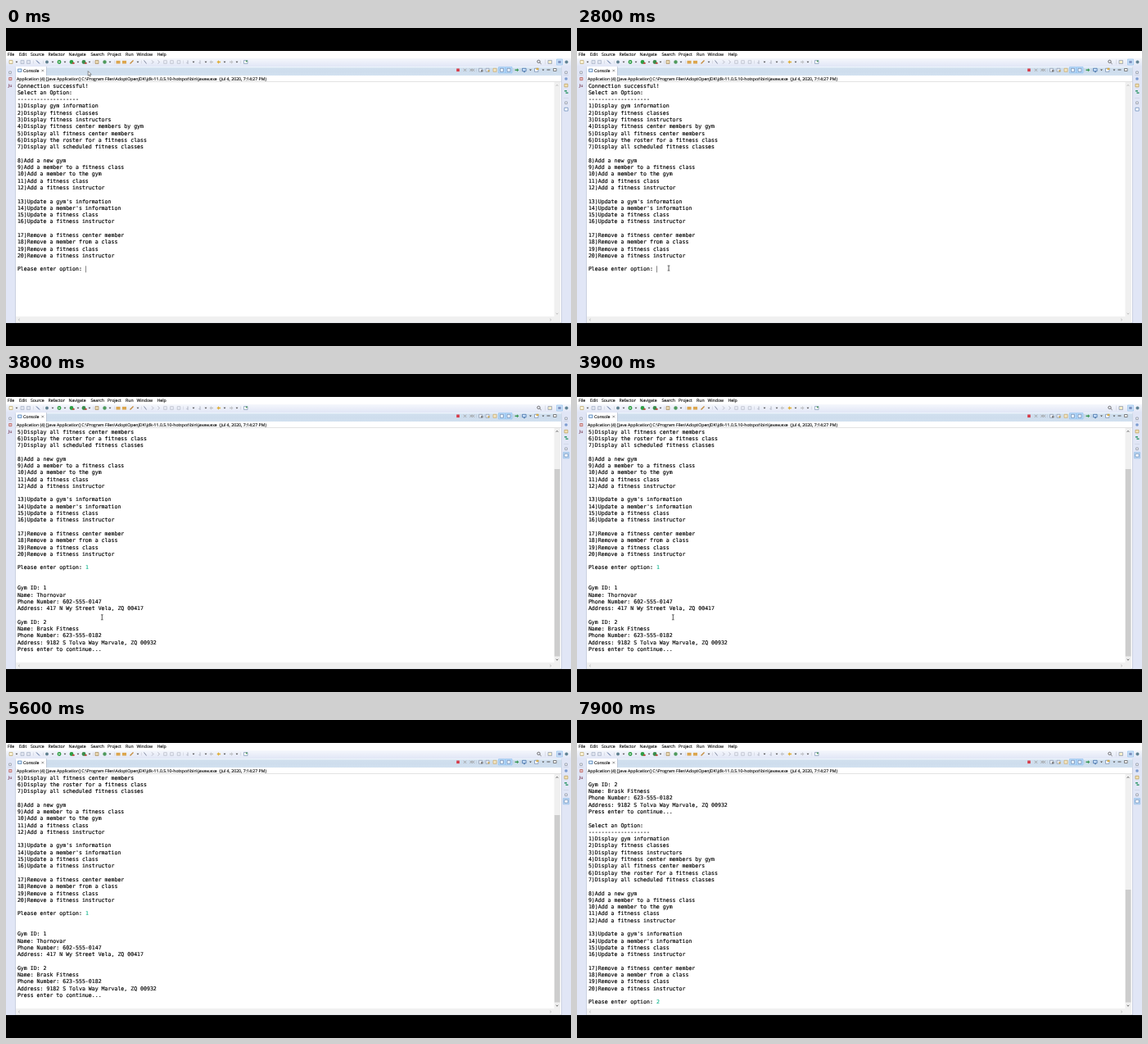
Write an HTML page with a canvas that moves like this. It is 690x388 px and loops after 8 s.

```html
<!DOCTYPE html>
<html lang="en">
<head>
<meta charset="utf-8">
<title>Console</title>
<style>
html, body { margin: 0; width: 100%; height: 100%; overflow: hidden; background: #000; }
canvas { display: block; }
</style>
</head>
<body>
<canvas id="stage" width="690" height="388"></canvas>
<script>
const ctx = document.getElementById('stage').getContext('2d');
const LOOP = 8000, STEP = 100;
const LINE = 8.296, CHAR = 3.96, LEFT = 13.9, FIRST = 72.5;
const MONO = '6.578px "DejaVu Sans Mono", monospace';
const UI = '5.2px "Open Sans", sans-serif';
const TRIM = '#e1e6f6', KEYLINE = '#b6bccc';

const MENU = `Select an Option:
-------------------
1)Display gym information
2)Display fitness classes
3)Display fitness instructors
4)Display fitness center members by gym
5)Display all fitness center members
6)Display the roster for a fitness class
7)Display all scheduled fitness classes

8)Add a new gym
9)Add a member to a fitness class
10)Add a member to the gym
11)Add a fitness class
12)Add a fitness instructor

13)Update a gym's information
14)Update a member's information
15)Update a fitness class
16)Update a fitness instructor

17)Remove a fitness center member
18)Remove a member from a class
19)Remove a fitness class
20)Remove a fitness instructor

`.split('\n').slice(0, -1);
const PROMPT = 'Please enter option: ';
const GYMS = `

Gym ID: 1
Name: Thornovar
Phone Number: 602-555-0147
Address: 417 N Wy Street Vela, ZQ 00417

Gym ID: 2
Name: Brask Fitness
Phone Number: 623-555-0182
Address: 9182 S Tolva Way Marvale, ZQ 00932
Press enter to continue...
`.split('\n');
const LINES = ['Connection successful!', ...MENU, PROMPT, ...GYMS, ...MENU, PROMPT];
const ASK1 = LINES.indexOf(PROMPT), ASK2 = LINES.length - 1;

function rect(x, y, w, h, color) {
  ctx.fillStyle = color;
  ctx.fillRect(x, y, w, h);
}

function shade(y, h, ...stops) {
  const g = ctx.createLinearGradient(0, y, 0, y + h);
  stops.forEach(([at, color]) => g.addColorStop(at, color));
  return g;
}

function box(x, y, w, h, color, fill) {
  if (fill) rect(x, y, w, h, fill);
  ctx.strokeStyle = color;
  ctx.lineWidth = 0.7;
  ctx.strokeRect(x, y, w, h);
}

function dot(x, y, r, color) {
  ctx.fillStyle = color;
  ctx.beginPath();
  ctx.arc(x, y, r, 0, 7);
  ctx.fill();
}

function poly(points, fill, stroke, width = 0.8) {
  ctx.beginPath();
  points.forEach(([x, y]) => ctx.lineTo(x, y));
  if (fill) { ctx.closePath(); ctx.fillStyle = fill; ctx.fill(); }
  if (stroke) { ctx.strokeStyle = stroke; ctx.lineWidth = width; ctx.stroke(); }
}

// A hairline stroke thickens the small type a little.
function text(str, x, y, font, color = '#111') {
  ctx.font = font;
  ctx.fillStyle = ctx.strokeStyle = color;
  ctx.lineWidth = 0.15;
  ctx.fillText(str, x, y);
  ctx.strokeText(str, x, y);
}

function caretDown(x, y, color = '#444') {
  poly([[x - 1.4, y - 0.7], [x + 1.4, y - 0.7], [x, y + 0.9]], color);
}

function cross(x, y, r, color) {
  poly([[x - r, y - r], [x + r, y + r]], null, color);
  poly([[x + r, y - r], [x - r, y + r]], null, color);
}

function chevron(x, y, dx, dy, color = '#888') {
  poly([[x - dx - dy * 1.6, y - dy - dx * 1.6], [x + dx, y + dy],
        [x - dx + dy * 1.6, y - dy + dx * 1.6]], null, color);
}

function drawMenu() {
  rect(0, 28, 690, 9, '#fff');
  const items = { File: 2, Edit: 16, Source: 30, Refactor: 51.5, Navigate: 76.5,
    Search: 103.5, Project: 124, Run: 146, Window: 159.5, Help: 184.5 };
  for (const name in items) text(name, items[name], 33.8, UI);
}

function drawToolbar() {
  const y = 41.5;
  rect(0, 37, 690, 10, shade(37, 10, [0, '#f5f7fc'], [1, TRIM]));
  box(4, y - 2, 4, 4, '#b9a56b', '#fdf6dc');
  [20, 27.5].forEach(x => box(x - 2, y - 2, 4, 4, '#a9b4c8', '#dfe4ee'));
  poly([[37, y - 2], [41, y + 2]], null, '#48628f', 1);
  dot(50, y, 1.9, '#5d7f8e');
  [[65, '#2f9e44'], [80, '#2f9e44'], [95, '#3c8d4c']].forEach(([x, c]) => dot(x, y, 2.4, c));
  poly([[64.3, y - 1.3], [66.3, y], [64.3, y + 1.3]], '#fff');
  [81, 96].forEach(x => rect(x, y + 0.5, 2.6, 1.8, '#b5483c'));
  box(109, y - 2, 4, 4, '#a58a5e', '#ead9b4');
  dot(120.5, y, 2.2, '#4f9a5d');
  [137, 144.5].forEach(x => rect(x - 2.5, y - 1.6, 5, 3.6, '#dca64e'));
  poly([[151.5, y + 2], [155.5, y - 2]], null, '#c58b3a', 1.2);
  poly([[168.5, y - 2], [171.5, y + 2]], null, '#8089a0', 1);
  [179, 186.5].forEach(x => poly([[x - 1, y - 2], [x + 1, y], [x - 1, y + 2]], null, '#a7a9b5'));
  [194.5, 202.5, 211].forEach(x => box(x - 1.8, y - 1.8, 3.6, 3.6, '#b6bac6'));
  [222, 237].forEach(x => poly([[x, y - 2], [x, y + 2], [x - 1.5, y + 0.5]], null, '#a2a8b5'));
  [[251, '#c3c5ca', -1], [260, '#dfae37', -1], [275, '#c3c5ca', 1]].forEach(([x, c, d]) => {
    poly([[x + d * 2.6, y], [x, y - 2.2], [x, y + 2.2]], c);
    rect(x - (d > 0 ? 2 : 0), y - 0.8, 2, 1.6, c);
  });
  box(290.5, y - 2, 4.5, 4, '#7d95b5', '#fff');
  dot(293.8, y - 1, 1.1, '#4f9a5d');
  [13, 57, 72, 88, 102, 127, 161, 229, 244, 267, 282].forEach(x => caretDown(x, y));
  [33.5, 45, 106, 132, 165, 216, 286].forEach(x => rect(x, y - 2, 0.5, 4, '#c6c9d3'));

  ctx.strokeStyle = '#555';
  ctx.lineWidth = 0.8;
  ctx.beginPath();
  ctx.arc(650.5, y - 0.6, 1.7, 0, 7);
  ctx.moveTo(651.8, y + 0.7);
  ctx.lineTo(653.6, y + 2.4);
  ctx.stroke();
  box(662, y - 2, 4.5, 4, '#8d98ad', '#f5edc9');
  rect(658, y - 3, 0.5, 6, '#c6c9d3');
  box(672.5, y - 3.5, 7, 7, '#9dc6ee', '#c9e0f7');
  rect(674.3, y - 1.5, 3.4, 3, '#7f93c2');
  dot(684.5, y, 2, '#638596');
}

function drawTabRow() {
  rect(11.5, 47, 667, 11, shade(47, 11, [0, '#f3f9ff'], [0.2, '#d0dfee'], [0.6, '#cedded'], [1, '#d2e1f0']));
  rect(12, 47, 37, 11, '#fff');
  rect(49, 47, 0.6, 11, KEYLINE);
  box(14.6, 50, 4.4, 3.4, '#3a6ea5', '#dcecff');
  text('Console', 21, 53.8, UI);
  cross(44.7, 52, 1.3, '#777');

  const y = 51.3;
  rect(550.2, y - 1.8, 3.6, 3.6, '#d63a48');
  cross(560.5, y, 1.6, '#999');
  cross(568, y, 1.6, '#999');
  cross(570.5, y, 1.6, '#999');
  [579.5, 588].forEach(x => box(x - 2, y - 2, 4, 4, '#8c99ad', '#e9edf4'));
  rect(580, y, 2.5, 2, '#777');
  rect(588.5, y, 2, 2, '#cfa54c');
  box(595, y - 2, 4, 4, '#cba967', '#f3e6c5');
  [605.5, 614].forEach(x => {
    box(x - 4, y - 3.6, 8, 7.2, '#90c1f0', '#b9dbfa');
    box(x - 2, y - 2, 4, 4, '#6885ad', '#eaf3fc');
  });
  rect(621.5, y - 0.8, 3.2, 1.6, '#3d9957');
  poly([[624, y - 2], [626.5, y], [624, y + 2]], '#3d9957');
  box(630.5, y - 2, 4.6, 3.4, '#35669f', '#c6defa');
  rect(632, y + 2, 2, 0.8, '#35669f');
  caretDown(640.5, y);
  box(645.5, y - 2, 4.4, 4, '#6885ad', '#fff');
  rect(647.5, y - 2.5, 3, 2.2, '#d5ab4b');
  caretDown(656, y);
  rect(660.5, y - 0.8, 4, 1, '#555');
  box(668.5, y - 1.8, 3.6, 3, '#555', '#fff');
  [574.5, 583.8, 619, 628].forEach(x => rect(x, y - 2, 0.4, 4, '#b4bfcf'));
}

function drawSides(active) {
  [5, 684].forEach(x => {
    box(x - 1.3, 53, 2.6, 2.6, '#7b8496', '#fff');
    rect(x - 3, 57.5, 6, 0.5, '#c2c8d8');
  });
  box(3.7, 60.5, 3.2, 3.2, '#b9574f', '#e6c3c4');
  text('Ju', 2.8, 71.8, UI, '#7a3d55');
  dot(684, 62, 1.8, '#7c9bd0');
  box(682, 68.3, 4, 3.6, '#b99b54', '#f4e3b7');
  rect(682, 76, 3, 1.6, '#3c9c72');
  rect(683.5, 78.4, 3, 1.6, '#3c9c72');
  rect(681, 85, 6, 0.5, '#c2c8d8');
  box(682.7, 90, 2.6, 2.6, '#7b8496', '#fff');
  if (active) box(680.6, 95.6, 7, 7.2, '#8cb8e6', '#c9e0f7');
  box(682, 97.3, 4.2, 3.8, '#5c83b5', '#fff');
}

function drawBars(thumbTop) {
  rect(669.5, 66, 7.5, 286, '#f0f0f0');
  if (thumbTop) rect(669.8, thumbTop, 6.7, 344.5 - thumbTop, '#cdcdcd');
  const color = thumbTop ? '#555' : '#b5b5b5';
  chevron(673, 70, 0, -0.8, color);
  chevron(673, 348.5, 0, 0.8, color);
  rect(12, 352, 665, 7.5, '#f0f0f0');
  chevron(16, 356, -0.8, 0, '#b5b5b5');
  chevron(665, 356, 0.8, 0, '#b5b5b5');
}

function drawFrame(thumbTop) {
  rect(0, 0, 690, 388, '#000');
  rect(0, 28, 690, 332, TRIM);
  drawMenu();
  drawToolbar();
  rect(11.5, 47, 667, 313, KEYLINE);
  rect(12, 58, 666, 301.5, '#fff');
  drawTabRow();
  text('Application (4) [Java Application] C:\\Program Files\\AdoptOpenJDK\\jdk-11.0.5.10-hotspot\\bin\\javaw.exe  (Jul 4, 2020, 7:14:27 PM)',
    13, 63.6, UI);
  rect(12, 65.5, 666, 0.5, '#c4c4c4');
  drawSides(thumbTop > 0);
  drawBars(thumbTop);
}

function drawConsole(top, end, t) {
  const rowY = i => FIRST + (i - top) * LINE;
  const inputX = LEFT + PROMPT.length * CHAR;
  for (let i = top; i <= end; i++) text(LINES[i], LEFT, rowY(i), MONO, '#000');
  if (t >= 3600 && top <= ASK1) text('1', inputX, rowY(ASK1), MONO, '#14b890');
  if (t >= 7900) text('2', inputX, rowY(ASK2), MONO, '#14b890');
  if (t < 3600) rect(97, rowY(ASK1) - 6.2, 0.7, 8, '#555');
}

// Pointer stops: time, x, y
const PATH = [
  [100, 100.2, 52.6], [500, 288, 264], [700, 190, 203], [1200, 190, 203],
  [1400, 202, 248], [1600, 183.6, 200.3], [2300, 183.6, 200.3], [2500, 112, 293],
  [3100, 112, 293], [3400, 117.3, 296.8], [4800, 117.3, 296.8], [5500, 124, 392]
];

function pointerAt(t) {
  const i = PATH.findIndex(p => p[0] > t);
  if (i < 0) return null;
  if (i === 0) return PATH[0].slice(1);
  const [t0, x0, y0] = PATH[i - 1], [t1, x1, y1] = PATH[i];
  const k = (t - t0) / (t1 - t0), e = k * k * (3 - 2 * k);
  return [x0 + (x1 - x0) * e, y0 + (y1 - y0) * e];
}

function drawPointer(t) {
  const pos = pointerAt(t);
  if (!pos || (t >= 3600 && t < 3800)) return;
  const [x, y] = pos;
  if (t >= 2500 && y < 350) {
    poly([[x, y - 3], [x, y + 3]], null, '#333', 0.8);
    [-3, 3].forEach(d => poly([[x - 1.4, y + d], [x + 1.4, y + d]], null, '#333', 0.7));
    return;
  }
  const shape = [[0, 0], [0, 5.6], [1.3, 4.5], [2.2, 6.6], [3.1, 6.2], [2.2, 4.2], [3.9, 4], [0, 0]];
  poly(shape.map(([a, b]) => [x + a, y + b]), '#fff', '#444', 0.6);
}

function draw(now) {
  const t = Math.floor((now % LOOP) / STEP) * STEP;
  ctx.textRendering = 'geometricPrecision';
  ctx.lineJoin = 'round';
  const [top, end, thumb] = t < 3800 ? [0, ASK1, 0]
    : t < 5700 ? [7, ASK1 + GYMS.length - 1, 116]
    : [34, ASK2, 207];
  drawFrame(thumb);
  drawConsole(top, end, t);
  drawPointer(t);
}

let start;
function tick(now) {
  if (start === undefined) start = now;
  draw(now - start);
  requestAnimationFrame(tick);
}
draw(0);
requestAnimationFrame(tick);
</script>
</body>
</html>
```
